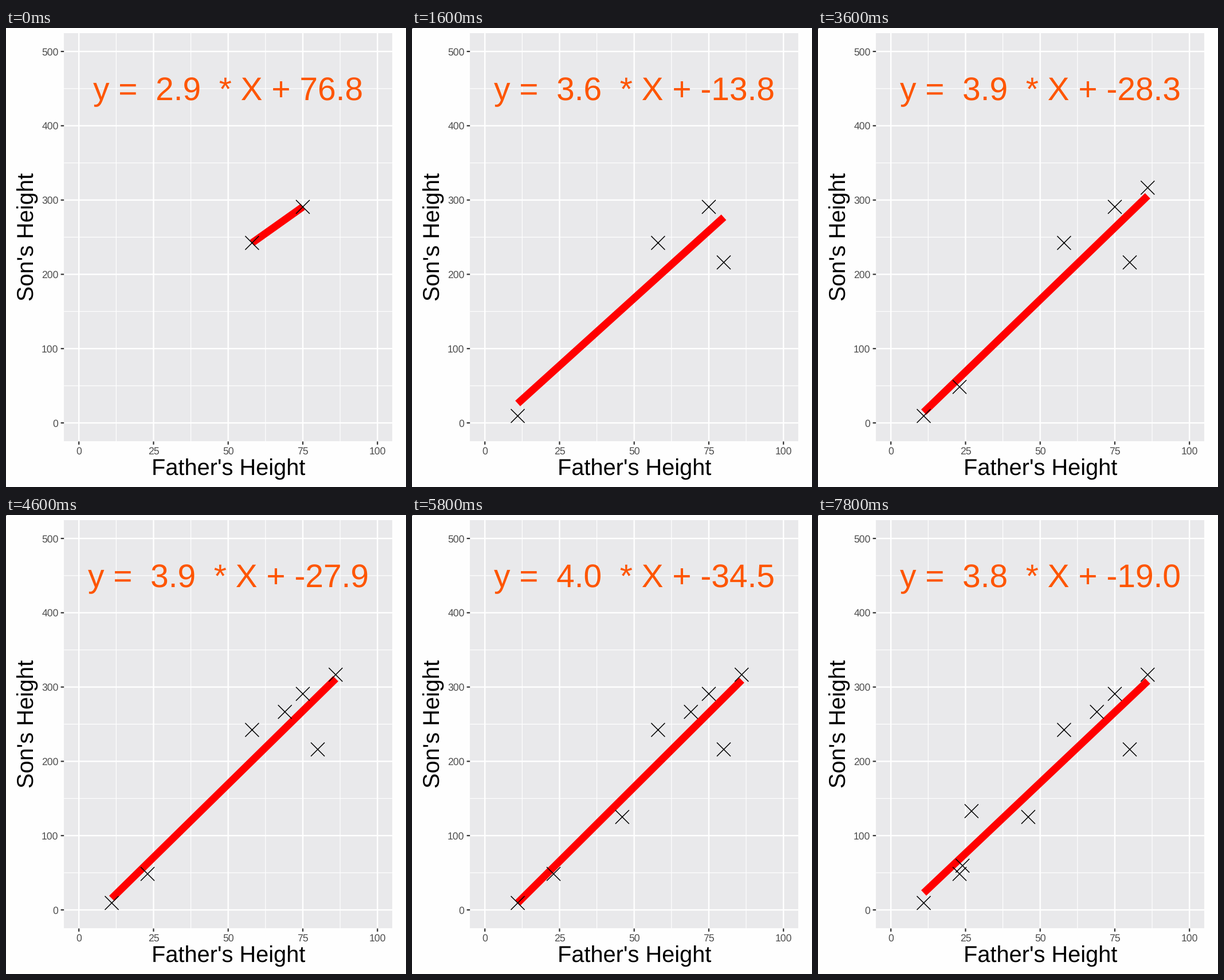
A matplotlib script for the animation above (8000 ms loop, 698 by 802 pixels).

```python
import numpy as np
import matplotlib.pyplot as plt
from matplotlib.animation import FuncAnimation
from matplotlib.patches import Rectangle

W, H, DPI = 698, 802, 64
PT = 72 / DPI  # points per pixel
STEP = 200
FRAMES = 40

plt.rcParams["font.family"] = "Liberation Sans"
plt.rcParams["text.hinting"] = "none"

# Observations in order of arrival; the first two are there from the start.
POINTS = np.array([
    (58, 242.3), (75, 290.8), (80, 216.05), (11, 9.35), (23, 48.45),
    (86, 316.6), (69, 266.6), (46, 125.1), (27, 133.0), (24, 59.5),
])
ARRIVALS = np.array([0, 0, 800, 1600, 2600, 3600, 4600, 5800, 6600, 7600])


def px(x):
    return 127.2 + 5.21 * np.asarray(x)


def py(y):
    return 690 - 1.298 * np.asarray(y)


fig = plt.figure(figsize=(W / DPI, H / DPI), dpi=DPI, facecolor="#fefefe")
ax = fig.add_axes([0, 0, 1, 1])
ax.set_xlim(0, W)
ax.set_ylim(H, 0)
ax.axis("off")

LEFT, RIGHT = px(-5), px(105)
TOP, BOTTOM = py(525), py(-25)


def stroke(xs, ys, color, width, z):
    line, = ax.plot(xs, ys, color=color, lw=width * PT, zorder=z,
                    solid_capstyle="butt", snap=False)
    return line


def label(x, y, text, size, color, ha="center", rotation=0):
    return ax.text(x, y, text, fontsize=size * PT, color=color, zorder=6,
                   ha=ha, va="baseline", rotation=rotation,
                   rotation_mode="anchor")


def vline(v, width, z):
    stroke([px(v)] * 2, [TOP, BOTTOM], "white", width, z)


def hline(v, width, z):
    stroke([LEFT, RIGHT], [py(v)] * 2, "white", width, z)


ax.add_patch(Rectangle((LEFT, TOP), RIGHT - LEFT, BOTTOM - TOP,
                       fc="#e9e9eb", ec="none", zorder=0))

for v in np.arange(12.5, 100, 25):
    vline(v, 1.2, 1)
for v in range(50, 500, 100):
    hline(v, 1.2, 1)

for v in range(0, 101, 25):
    vline(v, 2.4, 2)
    stroke([px(v)] * 2, [BOTTOM, BOTTOM + 5.5], "#333333", 2.2, 3)
    label(px(v), 745, str(v), 17.6, "#4d4d4d")
for v in range(0, 501, 100):
    hline(v, 2.4, 2)
    stroke([LEFT - 5.5, LEFT], [py(v)] * 2, "#333333", 2.2, 3)
    label(91.5, py(v) + 6.4, str(v), 17.6, "#4d4d4d", ha="right")

label(387.7, 782, "Father's Height", 39.8, "black")
label(49, 365, "Son's Height", 39.8, "black", rotation=90)

fit_line = stroke([], [], "#ff0000", 13, 4)
crosses = stroke([], [], "black", 1.5, 5)
equation = label(388, 126, "", 56.9, "#fe5500")
corner = ax.add_patch(Rectangle((0, 0), 1, 1, fc="black", ec="none", zorder=7))


def cross_path(x, y, r=12):
    """All crosses as one path, with gaps between the strokes."""
    gap = np.full_like(x, np.nan)
    xs = np.column_stack([x - r, x + r, gap, x - r, x + r, gap])
    ys = np.column_stack([y - r, y + r, gap, y + r, y - r, gap])
    return xs.ravel(), ys.ravel()


def draw(i):
    t = i * STEP
    x, y = POINTS[ARRIVALS <= t].T
    slope, intercept = np.polyfit(x, y, 1)
    ends = np.array([x.min(), x.max()])
    fit_line.set_data(px(ends), py(slope * ends + intercept))
    crosses.set_data(*cross_path(px(x), py(y)))
    equation.set_text(f"y =  {slope:.1f}  * X + {intercept:.1f}")
    corner.set_visible(t >= 200)
    return fit_line, crosses, equation, corner


anim = FuncAnimation(fig, draw, frames=FRAMES, interval=STEP,
                     repeat=True, repeat_delay=0, blit=False)
plt.show()
```
